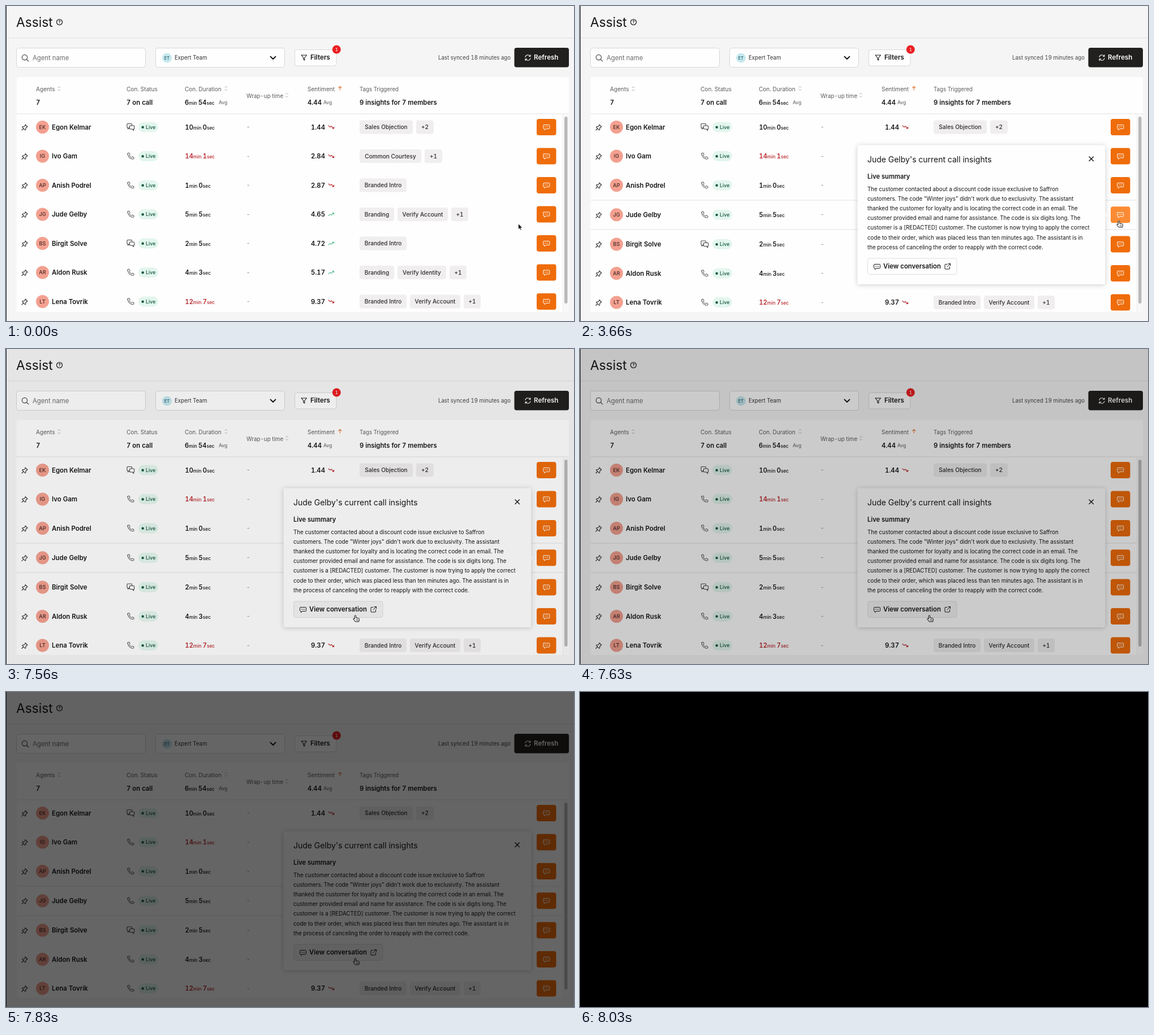
An HTML page for the animation above (8060 ms loop, 1004 px wide and 558 px high).

```html
<!DOCTYPE html>
<html lang="en">
<head>
<meta charset="utf-8">
<title>Assist</title>
<style>
  html, body { margin: 0; width: 100%; height: 100%; overflow: hidden; background: #000; }
  svg { display: block; width: 1004px; height: 558px; font-family: Inter, sans-serif; font-variant-numeric: tabular-nums; }
  .line { fill: none; stroke-linecap: round; stroke-linejoin: round; }
  #panels rect.card { filter: drop-shadow(0 1px 4px rgba(0, 0, 0, .2)); }
</style>
</head>
<body>
<svg id="stage" viewBox="0 0 1004 558"></svg>
<script>
const LOOP = 8060, OPEN = 1900, LOADED = 2660, FADE = 7560, FADE_STEPS = 15, FADE_STEP_MS = 33.5;
const INK = '#171616', GREY = '#5c5b5b', RED = '#b8262b', GREEN = '#58bd91', ORANGE = '#ef6c0a';

const text = (x, y, str, size, weight = 400, fill = INK, extra = '') =>
  `<text x="${x}" y="${(y + size * 0.36).toFixed(2)}" font-size="${size}" font-weight="${weight}" fill="${fill}" ${extra}>${str}</text>`;
const rect = (x, y, w, h, r, fill, extra = '') =>
  `<rect x="${x}" y="${y}" width="${w}" height="${h}" rx="${r}" fill="${fill}" ${extra}/>`;
const path = (d, color = INK, width = 1.1, extra = '') =>
  `<path class="line" d="${d}" stroke="${color}" stroke-width="${width}" ${extra}/>`;
const at = (x, y, body) => `<g transform="translate(${x} ${y})">${body}</g>`;
const circle = (x, y, r, fill, extra = '') => `<circle cx="${x}" cy="${y}" r="${r}" fill="${fill}" ${extra}/>`;
const middle = 'text-anchor="middle"';

// Icons are drawn around their own centre.
const icon = {
  bubble: color => path('M-4.5-4.5h9q1 0 1 1v5q0 1-1 1H-1l-2.5 2.3v-2.3h-1q-1 0-1-1v-5q0-1 1-1z', color, 1)
    + [-2.4, 0, 2.4].map(x => circle(x, -1, .7, color)).join(''),
  chats: path('M2-2.5v-2.5q0-1-1-1h-6.5q-1 0-1 1v5q0 1 1 1h.5v2.5l2.5-2.5M-1-2.5h6q1.2 0 1.2 1v4q0 1-1 1v2.5l-2.4-2.5h-3.8q-1 0-1-1v-4q0-1 1-1z', '#444', 1.1),
  phone: path('M-5.5-4.5q.2-1.2 1.4-1.2h1.6l1.2 3-1.5 1.2q1.2 2.7 4 4l1.3-1.5 3 1.3v1.6q-.1 1.4-1.4 1.4Q-4.8 4.5-5.5-4.5z', '#444', 1),
  pin: path('M1-5l4 4-1.2.5-2 2 .1 2.5-1 .8-5.2-5.2.8-1 2.5.1 2-2zM-2 2l-3 3', '#333', 1.1),
  sort: path('M-1.8-1.8L0-3.7 1.8-1.8M-1.8 1.8L0 3.7 1.8 1.8', '#a5a5a5', .9),
  down: path('M-5-2.5l3 2.7 2-1.7 4.5 4M1.8 2.5h2.8v-2.8', RED),
  up: path('M-5 2.5l3-2.7 2 1.7 4.5-4M1.8-2.5h2.8v2.8', GREEN),
  close: path('M-3.7-3.7L3.7 3.7M3.7-3.7L-3.7 3.7', INK, 1.4),
  external: path('M-.5-4h-3q-1 0-1 1v6.5q0 1 1 1h6.5q1 0 1-1v-3M1.5-5h3.5v3.5M5-5L-.5.5', INK, 1),
  refresh: path('M-4.5-1A4.6 4.6 0 0 1 4-2.5M4.5-5v2.7H1.8M4.5 1A4.6 4.6 0 0 1-4 2.5M-4.5 5V2.3H-1.8', '#fff')
};

const agents = [
  { name: 'Egon Kelmar', chat: 1, time: [10, 0], score: '1.44', tags: [['Sales Objection', 94], ['+2', 31]] },
  { name: 'Ivo Gam', time: [14, 1], late: 1, score: '2.84', tags: [['Common Courtesy', 109], ['+1', 31]] },
  { name: 'Anish Podrel', time: [1, 0], score: '2.87', tags: [['Branded Intro', 83]] },
  { name: 'Jude Gelby', time: [5, 5], score: '4.65', rise: 1, tags: [['Branding', 61], ['Verify Account', 89], ['+1', 30]] },
  { name: 'Birgit Solve', chat: 1, time: [2, 5], score: '4.72', rise: 1, tags: [['Branded Intro', 83]] },
  { name: 'Aldon Rusk', time: [4, 3], score: '5.17', rise: 1, tags: [['Branding', 61], ['Verify Identity', 86], ['+1', 30]] },
  { name: 'Lena Tovrik', time: [12, 7], late: 1, score: '9.37', tags: [['Branded Intro', 83], ['Verify Account', 89], ['+1', 30]] }
];
const ACTIVE = 3;
const rowY = i => 214.5 + 51.5 * i;

const duration = ([min, sec]) => {
  const unit = s => `<tspan font-size="8.4" font-weight="500">${s}</tspan>`;
  return `${min}${unit('min ')}${sec}${unit('sec')}`;
};

function tagList(tags) {
  let x = 625;
  return tags.map(([label, w]) => {
    const tag = rect(x, -12, w, 24, 4, '#f0eeee') + text(x + w / 2, 0, label, 10.1, 500, '#2c2a2a', middle);
    x += w + 6;
    return tag;
  }).join('');
}

function agentRow(a, i) {
  const initials = a.name.split(' ').map(word => word[0]).join('');
  return `<g class="row" transform="translate(0 ${rowY(i)})">`
    + at(33, .5, icon.pin)
    + circle(64.5, 0, 11.5, '#f3a090') + text(64.5, 0, initials, 9.2, 500, '#4b2a25', middle)
    + text(81, 0, a.name, 11.4, 600)
    + at(220.5, 0, a.chat ? icon.chats : icon.phone)
    + rect(234, -9, 35, 18, 9, '#e3f6ee') + circle(241.7, .3, 2.2, '#14573d') + text(247, 0, 'Live', 8.9, 500, '#14573d')
    + text(316.5, 0, duration(a.time), 11.1, 600, a.late ? RED : INK)
    + text(425, 0, '-', 10, 400, '#777')
    + text(564, 0, a.score, 11.3, 600, INK, 'text-anchor="end"') + at(575, 0, a.rise ? icon.up : icon.down)
    + tagList(a.tags)
    + rect(938, -14.5, 34.5, 29, 4, ORANGE, 'class="action"') + at(955.3, .5, icon.bubble('#fff'))
    + '</g>';
}

const toolbar = () =>
  text(18, 28.5, 'Assist', 22.8, 400)
  + circle(94.5, 28.5, 5, 'none', `stroke="${INK}" stroke-width="1.2"`) + text(94.5, 28.5, '?', 7.5, 700, INK, middle)
  + rect(0, 56, 1004, 1, 0, '#e2e2e2')
  + rect(18.5, 74.5, 228, 34, 4, '#fefefe', 'stroke="#d6d6d6"')
  + circle(33, 91, 4.6, 'none', 'stroke="#444" stroke-width="1.2"') + path('M36.5 94.5l3.3 3.3', '#444', 1.2)
  + text(47, 92, 'Agent name', 11.3, 400, '#6b6b6b')
  + rect(264.5, 74.5, 228, 34, 4, '#fefefe', 'stroke="#d6d6d6"')
  + circle(284.5, 92, 8.5, '#c5e8ef') + text(284.5, 92, 'ET', 7.5, 500, '#245563', middle)
  + text(298, 92, 'Expert Team', 9.7, 400, '#333')
  + path('M467.5 89.5l4.5 4.5 4.5-4.5', INK, 1.8)
  + rect(510.5, 77.5, 73.5, 28.5, 4, '#fefefe', 'stroke="#d9d9d9"')
  + path('M522 87h9.5l-3.7 4.5v4.5l-2-1.3v-3.2z')
  + text(538, 91.3, 'Filters', 11.6, 600)
  + circle(584.3, 77, 7.5, '#ea1f23') + text(584.3, 77, '1', 8, 400, '#fff', middle)
  + text(764, 91.5, '', 9.65, 400, '#444', 'id="synced"')
  + rect(898.5, 74, 96.5, 34.5, 4, '#22201f') + at(922.5, 91.5, icon.refresh)
  + text(933, 91, 'Refresh', 11.6, 600, '#fff');

const tableHead = () =>
  rect(18.5, 126, 976.5, 416, 3, '#fefefe')
  + rect(18.5, 190.5, 976.5, 1, 0, '#e4e4e4') + rect(984, 191, 1, 351, 0, '#eee') + rect(985, 191.5, 10, 350.5, 0, '#f8f8f8')
  + rect(987, 196, 5.5, 331, 2.75, '#b9b9b9')
  + text(53, 147.5, 'Agents', 10.1, 400, GREY) + at(94, 146.5, icon.sort)
  + text(53, 170.5, '7', 11.3, 600)
  + text(213, 147.5, 'Con. Status', 10.1, 400, GREY) + text(213, 170.5, '7 on call', 11.3, 600)
  + text(316, 147, 'Con. Duration', 10, 400, GREY) + at(389, 146, icon.sort)
  + text(316, 170.5, duration([6, 54]), 11.1, 600) + text(376, 171, 'Avg', 8.6, 400, GREY)
  + text(425, 159, 'Wrap-up time', 9.8, 400, GREY) + at(496.5, 158, icon.sort)
  + text(533, 147, 'Sentiment', 10.1, 400, GREY)
  + path('M590.3 149v-6.5M587.6 145l2.7-2.7 2.7 2.7', '#e07a3c')
  + text(533, 170.5, '4.44', 11.3, 600) + text(561, 171, 'Avg', 8.6, 400, GREY)
  + text(625, 147.5, 'Tags Triggered', 9.7, 400, GREY)
  + text(625, 170.5, '9 insights for 7 members', 11.3, 600);

const summary = [
  'The customer contacted about a discount code issue exclusive to Saffron',
  'customers. The code "Winter joys" didn\'t work due to exclusivity. The assistant',
  'thanked the customer for loyalty and is locating the correct code in an email. The',
  'customer provided email and name for assistance. The code is six digits long. The',
  'customer is a [REDACTED] customer. The customer is now trying to apply the correct',
  'code to their order, which was placed less than ten minutes ago. The assistant is in',
  'the process of canceling the order to reapply with the correct code.'
];

const panel = (id, top, bottom, body) =>
  `<g id="${id}">`
  + rect(490.5, top, 437.8, bottom - top, 3, '#fefefe', 'class="card"')
  + '<path d="M928 365l4.5 5-4.5 5z" fill="#f6f6f6"/>'
  + text(508, top + 25.5, agents[ACTIVE].name + "'s current call insights", 14, 400)
  + at(903.7, top + 24.3, icon.close)
  + rect(508.5, bottom - 46, 157.5, 28.5, 4, '#fefefe', 'class="view" stroke="#dedede"')
  + at(525, bottom - 31, icon.bubble(INK))
  + text(536, bottom - 32, 'View conversation', 11.35, 600)
  + at(649.5, bottom - 31.5, icon.external)
  + body + '</g>';

const spinner = '<g id="spinner">' + path('M-3.8-5.6A6.8 6.8 0 0 1 3.8-5.6', '#7377b8', 1.3) + '</g>';
const details = text(508, 301.5, 'Live summary', 11.1, 600)
  + summary.map((line, i) => text(508, 324.3 + i * 17.15, line, 9.78)).join('');

const cursors =
  '<path id="arrow" d="M0 0v10.5l2.5-2.3 1.6 3.6 1.8-.8-1.6-3.5h3.3z" fill="#111" stroke="#fff" stroke-width=".9"/>'
  + '<path id="hand" d="M-1.2.8Q0-.7 1.2.8v3.7l5 1.2q1 .4.8 1.6l-.8 4.2H-.3L-3.6 7q-.3-1.2.9-1.2l1.5 1z" fill="#fff" stroke="#111" stroke-width="1"/>'
  + path('M2.2 7.5v2M4.2 7.5v2', '#111', .7, 'id="knuckles"');

const stage = document.getElementById('stage');
stage.innerHTML = rect(0, 0, 1004, 558, 0, '#f5f5f5') + toolbar() + tableHead()
  + '<g id="divider">' + rect(19, 343.5, 965, 1, 0, '#e4e4e4') + rect(19, 395.5, 965, 1, 0, '#e4e4e4') + '</g>'
  + agents.map(agentRow).join('')
  + '<g id="panels">' + panel('loading', 291, 449.5, at(709, 366, spinner)) + panel('loaded', 246.5, 493, details) + '</g>'
  + rect(0, 0, 1, 558, 0, '#222')
  + `<g id="cursor">${cursors}</g>`
  + rect(0, 0, 1004, 558, 0, '#000', 'id="shade"');

const el = id => document.getElementById(id);
const show = (id, on) => { el(id).style.display = on ? '' : 'none'; };
const rows = [...stage.querySelectorAll('.row')];
const actionButton = rows[ACTIVE].querySelector('.action');
const viewButton = stage.querySelector('#loaded .view');

const clamp = v => Math.min(1, Math.max(0, v));
const ease = v => v * v * (3 - 2 * v);
const moves = [
  { from: 470, to: 800, dx: 47, dy: -5 },
  { from: 4930, to: 5760, dx: -335, dy: 91 }
];

function pointer(t) {
  let x = 905.5, y = 385.5;
  for (const m of moves) {
    const k = ease(clamp((t - m.from) / (m.to - m.from)));
    x += m.dx * k;
    y += m.dy * k;
  }
  return [x, y];
}

function draw(t) {
  const open = t >= OPEN, loaded = t >= LOADED;
  const [x, y] = pointer(t);
  const onAction = x > 938 && y < 385;
  const onView = loaded && x < 666 && y > 447;
  const hand = onAction || onView;

  el('cursor').setAttribute('transform', `translate(${x.toFixed(2)} ${y.toFixed(2)})`);
  show('arrow', !hand);
  show('hand', hand);
  show('knuckles', hand);
  actionButton.setAttribute('fill', onAction ? '#fb8b34' : ORANGE);
  viewButton.setAttribute('fill', onView ? '#f3f3f3' : '#fefefe');

  show('divider', open);
  show('loading', open && !loaded);
  show('loaded', loaded);
  el('spinner').setAttribute('transform', `rotate(${(t - OPEN) * .36})`);
  rows.forEach((row, i) => {
    const shift = !open || i < ACTIVE ? 0 : i === ACTIVE ? .8 : 1.5;
    row.setAttribute('transform', `translate(0 ${rowY(i) + shift})`);
  });
  el('synced').textContent = `Last synced ${open ? 19 : 18} minutes ago`;

  const step = Math.floor((t - FADE) / FADE_STEP_MS) + 1;
  el('shade').setAttribute('opacity', clamp(step / FADE_STEPS));
}

const start = performance.now();
function tick() {
  draw((performance.now() - start) % LOOP);
  requestAnimationFrame(tick);
}
tick();
</script>
</body>
</html>
```
